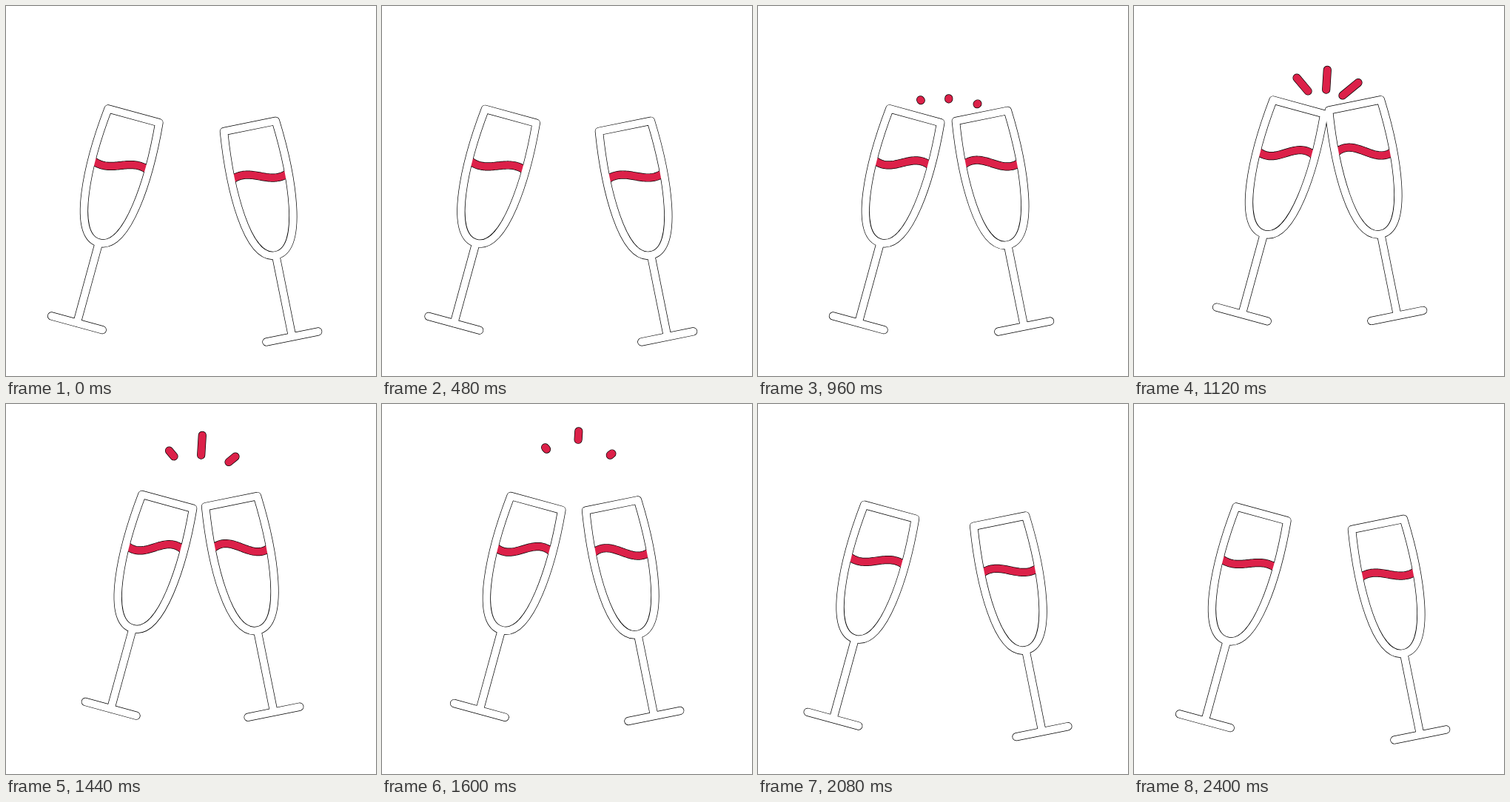
Recreate the animation shown at these times as an HTML page with a canvas. Size 500x500 px, loop 3.6 s.

```html
<!DOCTYPE html>
<html lang="en">
<head>
<meta charset="utf-8">
<title>Clinking glasses</title>
<style>
  html, body { margin: 0; width: 100%; height: 100%; overflow: hidden; background: #fff; }
  canvas { display: block; width: 500px; height: 500px; }
</style>
</head>
<body>
<canvas id="stage" width="500" height="500"></canvas>
<script>
const ctx = document.getElementById('stage').getContext('2d');
const LOOP = 3600, STEP = 80, LEAD = 400, LAST = 25;
const SPARK_START = 7, SPARK_END = 15;
const RED = '#dc2149', LINE = '#000', WHITE = '#fff';
const INNER = 9.8, OUTER = 11.2;

// Glass in its own axes: rim centre at the origin, stem pointing down.
const bowl = new Path2D('M-35.7 0C-43 75 -40 178 0 178C40 178 43 75 35.7 0Z');
const foot = new Path2D('M0 182V290.3M-35.6 290.3H35.6');

// reach: travel towards the other glass, fullest at step "meet".
// wine: centre and level of the surface; ripple: its steepness at rest.
const glasses = [
  { x: 172.5, y: 148.3, angle: 15.3, reach: [52, 8.5], meet: 10.2,
    wine: [155, 215.5], ripple: 3.7, side: 1 },
  { x: 329.4, y: 162.4, angle: -11.4, reach: [-31, -8.5], meet: 9,
    wine: [343.5, 230.1], ripple: 6, side: -1 }
];

// Each tip flies from "tip" by "drift"; the streak shrinks from step "fade".
const sparks = [
  { tip: [219.6, 126.8], drift: [1, -68], aim: 230, size: 23.4, fade: 9 },
  { tip: [257.8, 124.8], drift: [8, -88], aim: 273.5, size: 26.8, fade: 13 },
  { tip: [296.9, 132], drift: [14, -65], aim: 320.5, size: 27.3, fade: 9 }
];

const clamp = u => Math.max(0, Math.min(1, u));
const smooth = u => u * u * (3 - 2 * u);

// Rises from a to b, holds until c, settles back by d.
function pulse(step, a, b, c, d) {
  const rise = smooth(clamp((step - a) / (b - a)));
  const fall = smooth(clamp((step - c) / (d - c)));
  return rise * (1 - fall) ** 1.3;
}

function stroke(path, color, width) {
  ctx.strokeStyle = color;
  ctx.lineWidth = width;
  ctx.stroke(path);
}

function shiftOf(glass, step) {
  const near = pulse(step, 0, glass.meet, glass.meet, LAST);
  const dip = 2 * pulse(step, 0, 5, 5, 9);
  const lift = 24.5 * pulse(step, 5, 10.5, 12, LAST);
  return [glass.reach[0] * near, glass.reach[1] * near + dip - lift];
}

function place(glass, dx, dy) {
  ctx.translate(glass.x + dx, glass.y + dy);
  ctx.rotate(glass.angle * Math.PI / 180);
}

function strokeGlass(glass, step, color, width) {
  ctx.save();
  place(glass, ...shiftOf(glass, step));
  stroke(bowl, color, width);
  stroke(foot, color, width);
  ctx.restore();
}

// The wine surface is a cubic curve that steepens as the glass swings.
function wavePath({ wine: [x, y], ripple, side }, swing) {
  const path = new Path2D();
  const steep = ripple + 7 * swing, curl = 8 + 2.5 * swing;
  for (let u = -1.2; u <= 1.2; u += 0.05) {
    path.lineTo(x + 34 * u, y - 5.2 * swing + side * (curl * u ** 3 - steep * u));
  }
  return path;
}

function drawWine(glass, step) {
  const wave = wavePath(glass, pulse(step, 2, 10, 13, LAST));
  const [dx, dy] = shiftOf(glass, step);
  ctx.save();
  place(glass, dx, dy);
  ctx.clip(bowl);
  ctx.setTransform(1, 0, 0, 1, dx, dy);
  stroke(wave, LINE, OUTER);
  stroke(wave, RED, INNER);
  ctx.restore();
}

function drawSpark({ tip, drift, aim, size, fade }, step) {
  if (step < SPARK_START || step > SPARK_END) return;
  const flight = 1 - (1 - (step - SPARK_START) / (SPARK_END - SPARK_START)) ** 2;
  const length = 1 + (size - 1) * pulse(step, SPARK_START, 9, fade, 17);
  const [x, y] = tip.map((v, k) => v + drift[k] * flight);
  const turn = aim * Math.PI / 180;
  const line = new Path2D();
  line.moveTo(x, y);
  line.lineTo(x - length * Math.cos(turn), y - length * Math.sin(turn));
  stroke(line, LINE, OUTER);
  stroke(line, RED, INNER);
}

function draw(time) {
  const step = Math.max(0, Math.min(LAST, Math.floor((time - LEAD) / STEP)));
  ctx.fillStyle = WHITE;
  ctx.fillRect(0, 0, 500, 500);
  ctx.lineCap = ctx.lineJoin = 'round';
  glasses.forEach(glass => strokeGlass(glass, step, LINE, OUTER));
  glasses.forEach(glass => drawWine(glass, step));
  glasses.forEach(glass => strokeGlass(glass, step, WHITE, INNER));
  sparks.forEach(spark => drawSpark(spark, step));
}

function tick() {
  draw(performance.now() % LOOP);
  requestAnimationFrame(tick);
}
tick();
</script>
</body>
</html>
```
